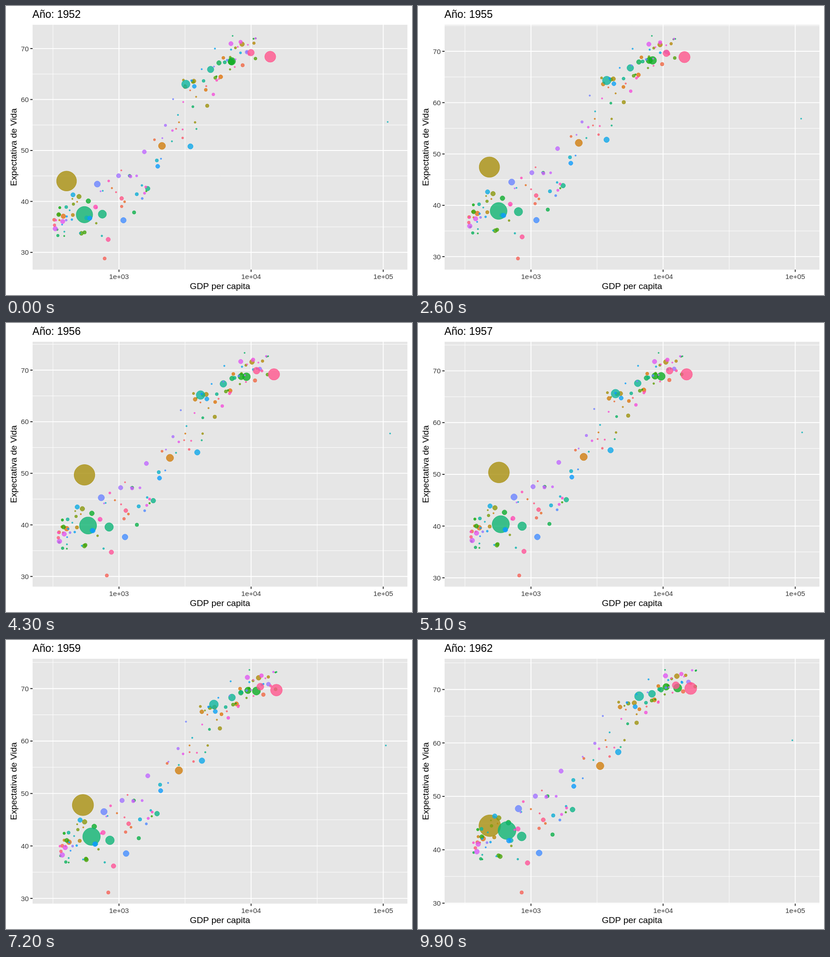
Write an HTML page with a canvas that moves like this. It is 885x632 px and loops after 10 s.

```html
<!DOCTYPE html>
<html lang="es">
<head>
<meta charset="utf-8">
<title>Expectativa de Vida</title>
<style>
  html, body { margin: 0; width: 100%; height: 100%; overflow: hidden; background: #fff; }
  canvas { display: block; }
</style>
</head>
<body>
<canvas id="chart" width="885" height="632"></canvas>
<script>
const ctx = document.getElementById('chart').getContext('2d');
const FONT = '"Liberation Sans", Arial, sans-serif';
const LEFT = 58, RIGHT = 875, TOP = 41, BOTTOM = 576.5;
const HUES = 142, STEPS = 100, STEP_MS = 100;

// Leading dots: hue index, population, then [x, life] at the start, end and, if bent, halfway
const leaders = [
  [1, 8.4, [215, 28.8], [226, 32]],
  [15, 57, [340, 50.9], [397, 55.7], [360, 53.3]],
  [25, 556, [132, 44], [156.5, 44.5], [177, 50.55]],
  [45, 42, [491, 67.4], [541, 70.5]],
  [48, 69, [492, 67.5], [566, 70.3]],
  [58, .15, [494, 72.49], [538.5, 73.68], [524, 73.47]],
  [59, 372, [171, 37.4], [194, 43.6], [180, 40.25]],
  [60, 82, [210, 37.5], [226, 42.5], [227, 39.9]],
  [65, 48, [446, 65.9], [510, 69.2]],
  [67, 86, [392, 63], [482, 68.75], [429, 65.5]],
  [72, .16, [832, 55.6], [816, 60.5], [838, 58.03]],
  [83, 30, [402, 50.8], [436.5, 58.3]],
  [95, 33, [256, 36.3], [264, 39.4]],
  [98, 41, [199, 43.4], [219, 47.7]],
  [134, 50, [534, 69.2], [562, 70.8]],
  [135, 158, [576, 68.4], [594.5, 70.2]]
];

const mix = (a, b, p) => a + (b - a) * p;
const clamp = (v, low, high) => Math.min(high, Math.max(low, v));

let seed = 52;
function random() {
  seed = (seed * 16807) % 2147483647;
  return seed / 2147483647;
}

// Polar CIELUV at lightness 65 and chroma 100, slightly darkened
function hueColor(index) {
  const h = (15 + 360 * (index - 1) / HUES) * Math.PI / 180;
  const Y = ((65 + 16) / 116) ** 3;
  const u = 100 * Math.cos(h) / 845 + .1978;
  const v = 100 * Math.sin(h) / 845 + .4683;
  const X = 9 * Y * u / (4 * v);
  const Z = 3 * Y / v - 5 * Y - X / 3;
  const channel = (a, b, c) => {
    const lin = clamp(a * X + b * Y + c * Z, .01, 1);
    const s = 1.055 * lin ** (1 / 2.4) - .055;
    return Math.round(255 * s ** 1.22);
  };
  return `rgb(${channel(3.2405, -1.5372, -.4985)},${channel(-.9693, 1.876, .0416)},${channel(.0556, -.204, 1.0573)})`;
}

function makeDot(hue, pop, from, to, mid = [mix(from[0], to[0], .5), mix(from[1], to[1], .5)]) {
  return { hue, pop, color: hueColor(hue), path: [from, mid, to] };
}

// A dot near the S-shaped trend; wealthier ones move further right, older ones gain fewer years
function crowdDot(hue) {
  const u = random() ** 1.15;
  const rise = u ** 1.25;
  const trend = 36 + 34.5 * rise * rise * (3 - 2 * rise);
  const spread = 3 + 36 * u * (1 - u) ** 1.3;
  const x = 105 + 440 * u;
  const life = clamp(trend + (random() + random() - 1) * spread, 31.5, 72);
  const wealth = clamp((life - 48) / 14, 0, 1);
  const dx = mix(16, 55, wealth) + (random() - .5) * 24;
  const gain = 5 - 3.4 * clamp((life - 60) / 11, 0, 1);
  const pop = .3 + 21 * random() ** 3;
  return makeDot(hue, pop, [x, life], [x + dx, life + gain]);
}

const dots = leaders.map(row => makeDot(...row));
const taken = new Set(dots.map(dot => dot.hue));
for (let hue = 1; hue <= HUES; hue++) if (!taken.has(hue)) dots.push(crowdDot(hue));
dots.sort((a, b) => a.hue - b.hue);

function place(dot, t) {
  const half = t < .5 ? 0 : 1;
  const [a, b] = [dot.path[half], dot.path[half + 1]];
  const p = t * 2 - half;
  return { x: mix(a[0], b[0], p), life: mix(a[1], b[1], p) };
}

function line(x0, y0, x1, y1, color, width) {
  ctx.strokeStyle = color;
  ctx.lineWidth = width;
  ctx.beginPath();
  ctx.moveTo(x0, y0);
  ctx.lineTo(x1, y1);
  ctx.stroke();
}

function text(str, x, y, size, color, align) {
  ctx.font = `${size}px ${FONT}`;
  ctx.fillStyle = color;
  ctx.textAlign = align;
  ctx.fillText(str, x, y);
}

function drawAxes(low, high, yOf) {
  ctx.fillStyle = '#e6e6e6';
  ctx.fillRect(LEFT, TOP, RIGHT - LEFT, BOTTOM - TOP);

  const levels = [];
  for (let v = 25; v <= 75; v += 5) if (v >= low && v <= high) levels.push(v);

  for (const v of levels) if (v % 10) line(LEFT, yOf(v), RIGHT, yOf(v), '#fff', 1);
  for (let k = 0; k < 3; k++) line(102.3 + 288 * k, TOP, 102.3 + 288 * k, BOTTOM, '#fff', 1);
  for (const v of levels) {
    if (v % 10) continue;
    const y = yOf(v);
    line(LEFT, y, RIGHT, y, '#fff', 1.9);
    line(LEFT - 5, y, LEFT, y, '#242424', 1.9);
    text(v, 49.5, y + 5.5, 15.4, '#3b3b3b', 'right');
  }
  for (let k = 0; k < 3; k++) {
    const x = 246.3 + 288 * k;
    line(x, TOP, x, BOTTOM, '#fff', 1.9);
    line(x, BOTTOM, x, BOTTOM + 5, '#242424', 1.9);
    text('1e+0' + (3 + k), x, 596.5, 15.4, '#3b3b3b', 'center');
  }
}

function drawDot(dot, x, y, t) {
  const r = 1 + .88 * Math.sqrt(dot.pop * (1 + .2 * t));
  ctx.beginPath();
  ctx.arc(x, y, r, 0, Math.PI * 2);
  ctx.fillStyle = ctx.strokeStyle = dot.color;
  ctx.lineWidth = 1;
  ctx.fill();
  ctx.stroke();
}

function draw(step) {
  const t = step / (STEPS - 1);
  const spots = dots.map(dot => place(dot, t));
  const lives = spots.map(s => s.life);
  const min = Math.min(...lives), max = Math.max(...lives);
  const pad = (max - min) * .05;
  const low = min - pad, high = max + pad;
  const yOf = v => BOTTOM - (v - low) / (high - low) * (BOTTOM - TOP);

  ctx.fillStyle = '#fff';
  ctx.fillRect(0, 0, 885, 632);
  drawAxes(low, high, yOf);

  ctx.globalAlpha = .8;
  dots.forEach((dot, k) => drawDot(dot, spots[k].x, yOf(spots[k].life), t));
  ctx.globalAlpha = 1;

  text('Año: ' + Math.round(1952 + 10 * t), 57.5, 26, 23.1, '#000', 'left');
  text('GDP per capita', 466.5, 618.5, 19.25, '#000', 'center');
  ctx.save();
  ctx.translate(23, 308.8);
  ctx.rotate(-Math.PI / 2);
  text('Expectativa de Vida', 0, 0, 19.25, '#000', 'center');
  ctx.restore();
}

const start = performance.now();
function tick() {
  const elapsed = performance.now() - start;
  draw(Math.floor(elapsed / STEP_MS) % STEPS);
  requestAnimationFrame(tick);
}
tick();
</script>
</body>
</html>
```
